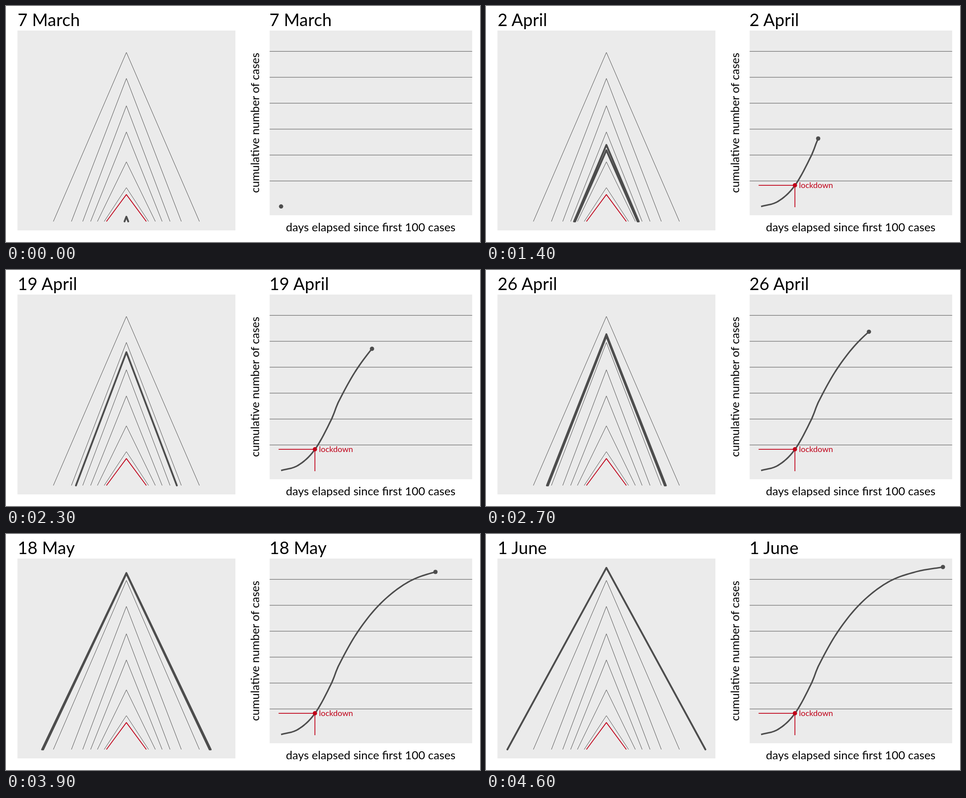
An HTML page that plays this animation: 1058x529 px, repeating every 5000 ms.

```html
<!DOCTYPE html>
<html lang="en">
<head>
<meta charset="utf-8">
<title>Cases over time</title>
<style>
  html, body { margin: 0; width: 100%; height: 100%; overflow: hidden; background: #fff; }
  svg { display: block; width: 1058px; height: 529px; }
  text { font-family: Lato, sans-serif; font-size: 25.8px; }
  .title { font-size: 38px; letter-spacing: .2px; }
  .mid { text-anchor: middle; }
  .panel { fill: #ebebeb; }
  path { fill: none; stroke: #4d4d4d; stroke-linejoin: round; }
  .thin { stroke-width: 1; }
  .bold { stroke-width: 4; stroke-linecap: round; }
  .curve { stroke-width: 3.3; }
  .red { stroke: #c00018; stroke-width: 1.8; }
  .dot { fill: #4d4d4d; }
  #lockdown circle, #lockdown text { fill: #c00018; }
  #lockdown text { font-size: 18px; }
</style>
</head>
<body>
<svg viewBox="0 0 1058 529">
  <rect class="panel" x="25.5" y="55" width="486.5" height="448"/>
  <rect class="panel" x="588.5" y="55" width="452" height="414"/>
  <text class="title" x="26" y="45"></text>
  <text class="title" x="588" y="45"></text>
  <text class="mid" x="814" y="505">days elapsed since first 100 cases</text>
  <text class="mid" transform="translate(565 262) rotate(-90)">cumulative number of cases</text>
  <path class="thin" id="grid"/>
  <path class="thin" id="marks"/>
  <path class="red" id="lockMark"/>
  <path class="bold" id="now"/>
  <path class="curve" id="curve"/>
  <circle class="dot" id="dot" r="4.8"/>
  <g id="lockdown">
    <path class="red" d="M608.5 401.8H689.5V451"/>
    <circle cx="689.5" cy="401.8" r="4.8"/>
    <text x="698.5" y="408">lockdown</text>
  </g>
</svg>
<script>
const LOOP = 5000, STEP = 100, STEPS = 46, DAYS = 86, LOCKDOWN = 16;
const BASE = 450, GRID = 58.1, LINES = [1, 2, 3, 4, 5, 6];

// key points of the case curve: day, height in px
const KEYS = [[0, .7], [8, 12], [16, 47.7], [24, 117], [27, 153],
              [36, 229], [47, 294], [60, 342], [73, 365], [86, 376]];

const $ = id => document.getElementById(id);
const setPath = (id, d) => $(id).setAttribute('d', d);
const titles = document.querySelectorAll('.title');

function slope(i) {
  const [d0, c0] = KEYS[Math.max(0, i - 1)];
  const [d1, c1] = KEYS[Math.min(KEYS.length - 1, i + 1)];
  return (c1 - c0) / (d1 - d0);
}

// smooth cubic through the key points
function cases(day) {
  const i = Math.max(1, KEYS.findIndex(k => k[0] >= day));
  const [d0, c0] = KEYS[i - 1], [d1, c1] = KEYS[i];
  const span = d1 - d0, u = (day - d0) / span, v = 1 - u;
  return c0 + (c1 - c0) * u * u * (3 - 2 * u)
    + span * u * v * (v * slope(i - 1) - u * slope(i));
}

const px = day => 614 + 4.72 * day;
const py = day => BASE - cases(day);

function firstDayAbove(height) {
  let day = 0;
  while (cases(day) < height) day++;
  return day;
}

function chevron(day) {
  const half = 4.2 + 2.521 * day, top = 473 - 1.0565 * cases(day);
  return `M${268.7 - half} 483L268.7 ${top}L${268.7 + half} 483`;
}

function curve(last) {
  const points = Array.from({ length: last + 1 }, (_, day) => `${px(day)} ${py(day)}`);
  return 'M' + points.join('L');
}

function dateText(day) {
  const date = new Date(Date.UTC(2021, 2, 7 + day));
  const month = ['March', 'April', 'May', 'June'][date.getUTCMonth() - 2];
  return `${date.getUTCDate()} ${month}`;
}

setPath('grid', LINES.map(n => `M588.5 ${BASE + .3 - GRID * n}H1040.5`).join(''));
setPath('marks', LINES.map(n => chevron(firstDayAbove(GRID * n))).join(''));
setPath('lockMark', chevron(LOCKDOWN));

function draw(step) {
  const pos = step * DAYS / STEPS;
  const day = Math.floor(pos), next = Math.ceil(pos);
  titles.forEach(t => { t.textContent = dateText(day); });
  setPath('now', chevron(day) + chevron(next));
  setPath('curve', curve(next));
  $('dot').setAttribute('cx', px(next));
  $('dot').setAttribute('cy', py(next));
  $('lockdown').style.display = next >= LOCKDOWN ? '' : 'none';
}

const start = performance.now();
let shown = -1;

function tick() {
  const t = (performance.now() - start) % LOOP;
  const step = Math.min(STEPS, Math.floor(t / STEP));
  if (step !== shown) draw(shown = step);
  requestAnimationFrame(tick);
}
tick();
</script>
</body>
</html>
```
